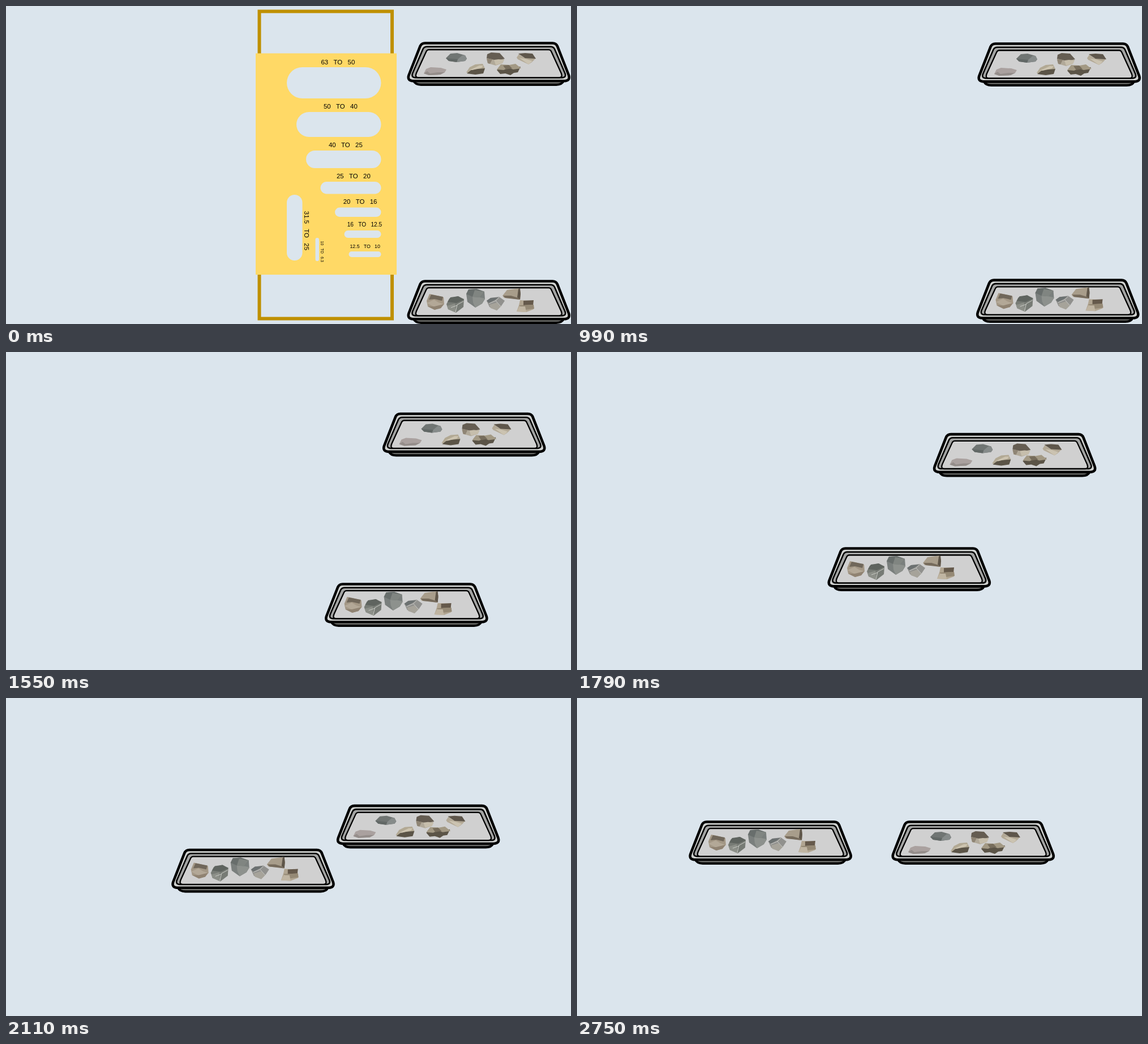
Animation of 998 by 561 pixels, one loop 2790 ms. Source, as an HTML page:

```html
<!DOCTYPE html>
<html lang="en">
<head>
<meta charset="utf-8">
<title>Thickness gauge and trays</title>
<style>
  html, body { margin: 0; width: 100%; height: 100%; overflow: hidden; background: #dbe5ed; }
  svg { display: block; width: 998px; height: 561px; }
  text { font-family: "Liberation Sans", Arial, sans-serif; white-space: pre; }
</style>
</head>
<body>
<svg viewBox="0 0 998 561">
  <defs>
    <g id="tray" stroke="#000" stroke-linejoin="round">
      <path d="M720 132Q723 138.800 733 138.800H972Q982 138.800 985 132Z" fill="#777875" stroke-width="4.200"/>
      <path d="M740 65.500H965.500Q971.500 65.500 974 71L994 122Q997.500 132.300 985 132.300H720.500Q708 132.300 711.500 122L731.500 71Q734 65.500 740 65.500Z" fill="#cfd1cf" stroke-width="4.600"/>
      <path d="M743.500 71.700H962Q967 71.700 969 76L987.500 119Q990 126.400 982 126.400H723.500Q715.500 126.400 718 119L736.500 76Q738.500 71.700 743.500 71.700Z" fill="#a3a4a3" stroke-width="2.600"/>
      <path d="M747 77.200H958.500Q962 77.200 963.500 81L980.500 118Q984 126.400 977 126.400H728.500Q721.500 126.400 725 118L742 81Q743.500 77.200 747 77.200Z" fill="#d0d0d0" stroke-width="2.300"/>
    </g>
  </defs>
  <g id="gauge">
    <rect x="447.500" y="9.500" width="234.500" height="542" fill="none" stroke="#bf9000" stroke-width="6"/>
    <rect x="441" y="83.500" width="249" height="390.500" fill="#ffd966"/>
  </g>
  <g id="upper">
    <use href="#tray"/>
    <path fill="#707573" d="M777 92L785 84 797 83 811 87 814 93 811 97 796 99 782 97Z"/>
    <path fill="#868b8a" d="M798 94L806 87 811 87 814 93 811 97 796 99Z"/>
    <path fill="#626866" d="M777 92L798 94 796 99 782 97Z"/>
    <path fill="#aaa19f" d="M738 119L742 111 750 108 768 109 778 112 775 117 767 121 747 122Z"/>
    <path fill="#948d8a" d="M738 119L744 115 749 119 762 117 775 117 767 121 747 122Z"/>
    <path fill="#b1a999" d="M849 94L853 92 880 94 877 101 865 105 851 101Z"/>
    <path fill="#655d52" d="M850 85L857 82 872 83 881 93 867 96 849 92Z"/>
    <path fill="#c6beac" d="M862 95L870 94 880 95 877 101 865 104Z"/>
    <path fill="#8f8575" d="M849 92L859 94 855 102 851 101Z"/>
    <path fill="#b3a996" d="M902 91L906 85 915 91 936 92 929 99 923 103 904 94Z"/>
    <path fill="#5e564b" d="M905 84L917 83 930 84 936 93 917 92Z"/>
    <path fill="#cbc3b1" d="M907 92L917 93 930 97 923 103Z"/>
    <path fill="#b2a994" d="M813 117L819 108 829 103 842 102 846 110 830 115 818 119Z"/>
    <path fill="#5b5447" d="M814 119L823 112 846 110 843 119 829 121Z"/>
    <path fill="#cdc4b0" d="M819 113L836 105 843 105 840 109 824 113Z"/>
    <path fill="#5b5447" d="M867 113L874 107 890 109 909 107 904 117 897 118 891 122 882 119 873 120Z"/>
    <path fill="#a39984" d="M867 112L874 103 889 104 900 102 910 110 896 112 888 109 879 113Z"/>
    <path fill="#776d5c" d="M878 105L888 104 894 110 883 112Z"/>
  </g>
  <g id="lower">
    <use href="#tray" y="420"/>
    <path fill="#a39785" d="M743 520L748 508 758 510 773 514 774 526 768 533 757 536 745 530Z"/>
    <path fill="#70675a" d="M751 509L772 513 770 520 757 517 747 518Z"/>
    <path fill="#b3a897" d="M743 524L756 518 764 523 773 526 757 531Z"/>
    <path fill="#908372" d="M745 530L757 530 773 526 768 533 757 536Z"/>
    <path fill="#777b75" d="M778 526L783 516 798 512 809 517 808 531 795 541 781 535Z"/>
    <path fill="#5f645f" d="M780 522L785 514 799 512 809 518 796 524Z"/>
    <path fill="#8c8f88" d="M779 529L793 525 795 541 781 535Z"/>
    <path fill="none" stroke="#c9cbc5" d="M794 540L797 527 808 521M797 528L786 532"/>
    <path fill="#7a7f7d" d="M813 508L817 500 831 499 845 504 846 517 841 525 829 532 815 522Z"/>
    <path fill="#686e6c" d="M817 500L831 499 845 504 837 514 824 513 813 508Z"/>
    <path fill="#8d918d" d="M824 513L837 514 846 516 841 525 829 532 825 523Z"/>
    <path fill="#808581" d="M828 501L845 504 837 514 824 513Z"/>
    <path fill="#91918e" d="M849 520L856 515 871 513 881 520 875 529 867 537 854 531Z"/>
    <path fill="#6c7171" d="M849 520L856 515 870 514 863 519 853 524Z"/>
    <path fill="#a6a39a" d="M854 527L867 523 874 530 867 537 856 533Z"/>
    <path fill="none" stroke="#c7c8c4" d="M853 525L865 520 871 514M865 520L875 531"/>
    <path fill="#a89d8b" d="M877 511L885 501 906 498 909 505 908 518 894 516 880 515Z"/>
    <path fill="#5f564a" d="M905 499L908 498 909 508 908 518 903 514Z"/>
    <path fill="#766b5c" d="M878 511L892 511 905 515 907 518 882 515Z"/>
    <path fill="#b1a591" d="M902 539L906 528 908 519 931 520 932 535 919 540Z"/>
    <path fill="#65594b" d="M914 520L932 519 931 527 914 528Z"/>
    <path fill="#958975" d="M906 528L932 527 933 534 917 536Z"/>
    <path fill="#c0b5a2" d="M902 539L907 530 917 530 919 540Z"/>
  </g>
</svg>
<script>
const gauge = document.getElementById("gauge");

function add(tag, attrs, text = "") {
  const el = document.createElementNS("http://www.w3.org/2000/svg", tag);
  for (const key in attrs) el.setAttribute(key, attrs[key]);
  el.textContent = text;
  gauge.append(el);
}

function slot(x, y, width, height) {
  add("rect", { x, y, width, height, rx: Math.min(width, height) / 2, fill: "#dbe5ed" });
}

function label(text, x, y, size, angle = 0) {
  add("text", { transform: `translate(${x} ${y}) rotate(${angle})`, "font-size": size },
    text.replace(" TO ", "   TO   "));
}

// label, label x, baseline, font size, slot left, top, height
[
  ["63 TO 50", 556.5, 102.7, 11.4, 496, 108, 55],
  ["50 TO 40", 561, 181.2, 11.4, 513, 187, 44],
  ["40 TO 25", 570, 248.8, 11.4, 530, 255, 31],
  ["25 TO 20", 584, 304.3, 11.4, 555.5, 310, 21.5],
  ["20 TO 16", 595.7, 348.7, 11.4, 581, 355.5, 16.5],
  ["16 TO 12.5", 602.7, 388.5, 10.1, 597.5, 396, 13],
  ["12.5 TO 10", 607.4, 426.7, 8.8, 605.5, 433, 10]
].forEach(([text, x, y, size, left, top, height]) => {
  label(text, x, y, size);
  slot(left, top, 662.5 - left, height);
});
slot(496, 333, 27.5, 116);
slot(546.5, 409, 6.5, 41);
label("31.5 TO 25", 527, 361.8, 11.4, 90);
label("10 TO 6.3", 555.7, 414.7, 6.7, 90);

const LOOP = 2790, HIDE = 540, START = 790, STEP = 40, STEPS = 49;
const ease = u => u - Math.sin(2 * Math.PI * u) / (2 * Math.PI);

function shift(id, dx, dy, p) {
  document.getElementById(id).setAttribute("transform", `translate(${dx * p} ${dy * p})`);
}

function draw(now) {
  const t = now % LOOP;
  const step = Math.floor((t - START) / STEP);
  const p = ease(Math.min(Math.max(step / STEPS, 0), 1));
  gauge.setAttribute("visibility", t < HIDE ? "visible" : "hidden");
  shift("upper", -153, 153, p);
  shift("lower", -511, -267, p);
  requestAnimationFrame(draw);
}
draw(0);
</script>
</body>
</html>
```
